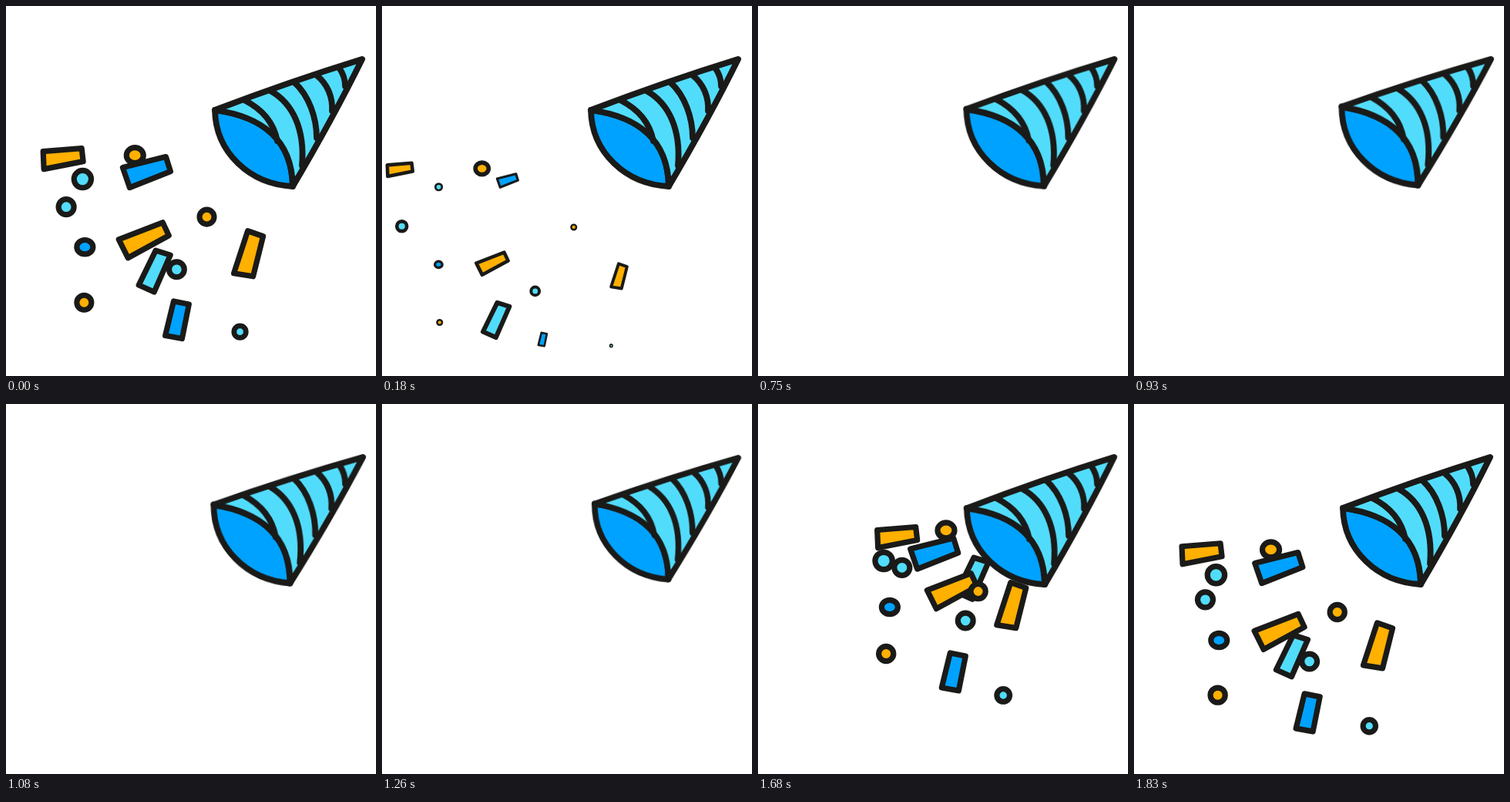
Animation, 480 px wide and 480 px high, one loop 1860 ms. Source, as an HTML page without scripts:

```html
<!DOCTYPE html>
<html lang="en">
<head>
<meta charset="utf-8">
<title>Party popper</title>
<style>
html, body { margin: 0; width: 100%; height: 100%; overflow: hidden; background: #fff; }
svg { display: block; width: 100%; height: 100%; }

.ink { stroke: #1a1a18; stroke-width: 7.2; stroke-linejoin: round; stroke-linecap: round; }
.cyan { fill: #52dcfb; }
.blue { fill: #00a2ff; }
.gold { fill: #ffb000; }
.line { fill: none; }

.cone {
  stroke-width: 7.8;
  transform-origin: 462px 69px;
  animation: recoil 1860ms infinite cubic-bezier(.4, 0, .6, 1);
}
@keyframes recoil {
  0%, 9.68% { transform: none; }
  22.58%, 29.03% { transform: translate(1px, 0) rotate(1.4deg) scale(1.005); }
  39.52% { transform: translate(.3px, 0) rotate(.4deg) scale(1.002); }
  50% { transform: translate(1px, 0) rotate(1.4deg) scale(1.005); }
  54.03% { transform: translate(.7px, 0) rotate(1.1deg) scale(1.003); }
  58.06%, 63.7% { transform: translate(1px, 0) rotate(1.4deg) scale(1.005); }
  72.58% { transform: translate(-1px, 2px) rotate(1.2deg) scale(.92); }
  80.65% { transform: translate(0, -2px) rotate(-1.3deg) scale(1.027); }
  91.94%, 100% { transform: none; }
}

/* x,y: place at loop start; u,v: drift still to come; s: shrink start in ms */
.bit {
  --ox: 345px; --oy: 172px;
  animation: fly 1860ms -350ms infinite, grow 1860ms -350ms infinite;
}
.early { animation: fly-early 1860ms -400ms infinite, grow 1860ms -400ms infinite; }
.bit > * { animation: shrink 1860ms calc(var(--s) * 1ms - 1860ms) infinite; }

@keyframes fly {
  0% { translate: var(--ox) var(--oy); animation-timing-function: cubic-bezier(.3, .4, .7, .85); }
  10.75% {
    translate: calc(var(--x) * 1px - var(--u) * 1.383px) calc(var(--y) * 1px - var(--v) * 1.383px);
    animation-timing-function: cubic-bezier(.333, 1, .667, 1);
  }
  42.85%, 100% { translate: calc((var(--x) + var(--u)) * 1px) calc((var(--y) + var(--v)) * 1px); }
}
@keyframes fly-early {
  0% { translate: var(--ox) var(--oy); animation-timing-function: cubic-bezier(.3, .4, .7, .85); }
  13.44% {
    translate: calc(var(--x) * 1px - var(--u) * 1.383px) calc(var(--y) * 1px - var(--v) * 1.383px);
    animation-timing-function: cubic-bezier(.333, 1, .667, 1);
  }
  45.54%, 100% { translate: calc((var(--x) + var(--u)) * 1px) calc((var(--y) + var(--v)) * 1px); }
}
@keyframes grow {
  0% { scale: .5; }
  8%, 50% { scale: 1; }
  50.01%, 100% { scale: 0; }
}
@keyframes shrink {
  0% { scale: 1; animation-timing-function: cubic-bezier(.33, 0, .67, 1); }
  17.74%, 60% { scale: 0; }
  60.01%, 100% { scale: 1; }
}
</style>
</head>
<body>
<svg viewBox="0 0 480 480" class="ink">
  <g class="cone">
    <path class="blue" d="M271 135C272 190 316 231 372 234C371 172 330 143 271 135Z"/>
  </g>

  <g transform="translate(.6 .5)">
    <g class="bit" style="--x:74;--y:198;--u:-65;--v:18;--s:46"><path class="gold" d="M-26-10 24-14 26 3-25 13Z"/></g>
    <g class="bit" style="--x:99;--y:224;--u:-33;--v:13;--s:-11"><circle class="cyan" r="11.2"/></g>
    <g class="bit" style="--x:78;--y:260;--u:-67;--v:32;--s:48"><circle class="cyan" r="10"/></g>
    <g class="bit" style="--x:102;--y:312;--u:-37;--v:29;--s:6"><ellipse class="blue" rx="10.5" ry="9.2"/></g>
    <g class="bit" style="--x:101;--y:384;--u:-34;--v:33;--s:-19"><circle class="gold" r="9.6"/></g>
    <g class="bit" style="--x:167;--y:193;--u:-48;--v:22;--s:81"><ellipse class="gold" rx="11" ry="10"/></g>
    <g class="bit" style="--x:182;--y:215;--u:-25;--v:14;--s:2"><path class="blue" d="M-31-6 25-20 31-1-22 20Z"/></g>
    <g class="bit" style="--x:221;--y:341;--u:-29;--v:36;--s:26"><circle class="cyan" r="9.9"/></g>
    <g class="bit" style="--x:193;--y:343;--u:-57;--v:81;--s:97"><path class="cyan" d="M1-27 20-21-1 27-21 18Z"/></g>
    <g class="bit" style="--x:179;--y:303;--u:-46;--v:39;--s:46"><path class="gold" d="M-33-1 24-23 32-6-21 23Z"/></g>
    <g class="bit" style="--x:314;--y:321;--u:-9;--v:37;--s:26"><path class="gold" d="M-1-30 19-23 6 29-19 25Z"/></g>
    <g class="bit early" style="--x:260;--y:273;--u:-15;--v:17;--s:-19;--ox:342px;--oy:150px"><circle class="gold" r="9.6"/></g>
    <g class="bit early" style="--x:221;--y:407;--u:-17;--v:32;--s:-16;--ox:363px;--oy:141px"><path class="blue" d="M-4-25 16-21 7 24-15 20Z"/></g>
    <g class="bit early" style="--x:303;--y:422;--u:-8;--v:23;--s:-51;--ox:365px;--oy:206px"><circle class="cyan" r="8.3"/></g>
  </g>

  <g class="cone">
    <path class="cyan" d="M271 135C330 143 371 172 372 234Q424 146 462 69Q368 98 271 135Z"/>
    <path class="line" d="M309 122Q345 140 352 175M343 110C372 126 388 160 384 207M374 99C393 116 403 145 403 171M403 90C417 101 424 118 423 136M432 80Q440 91 440 104"/>
  </g>
</svg>
</body>
</html>
```
